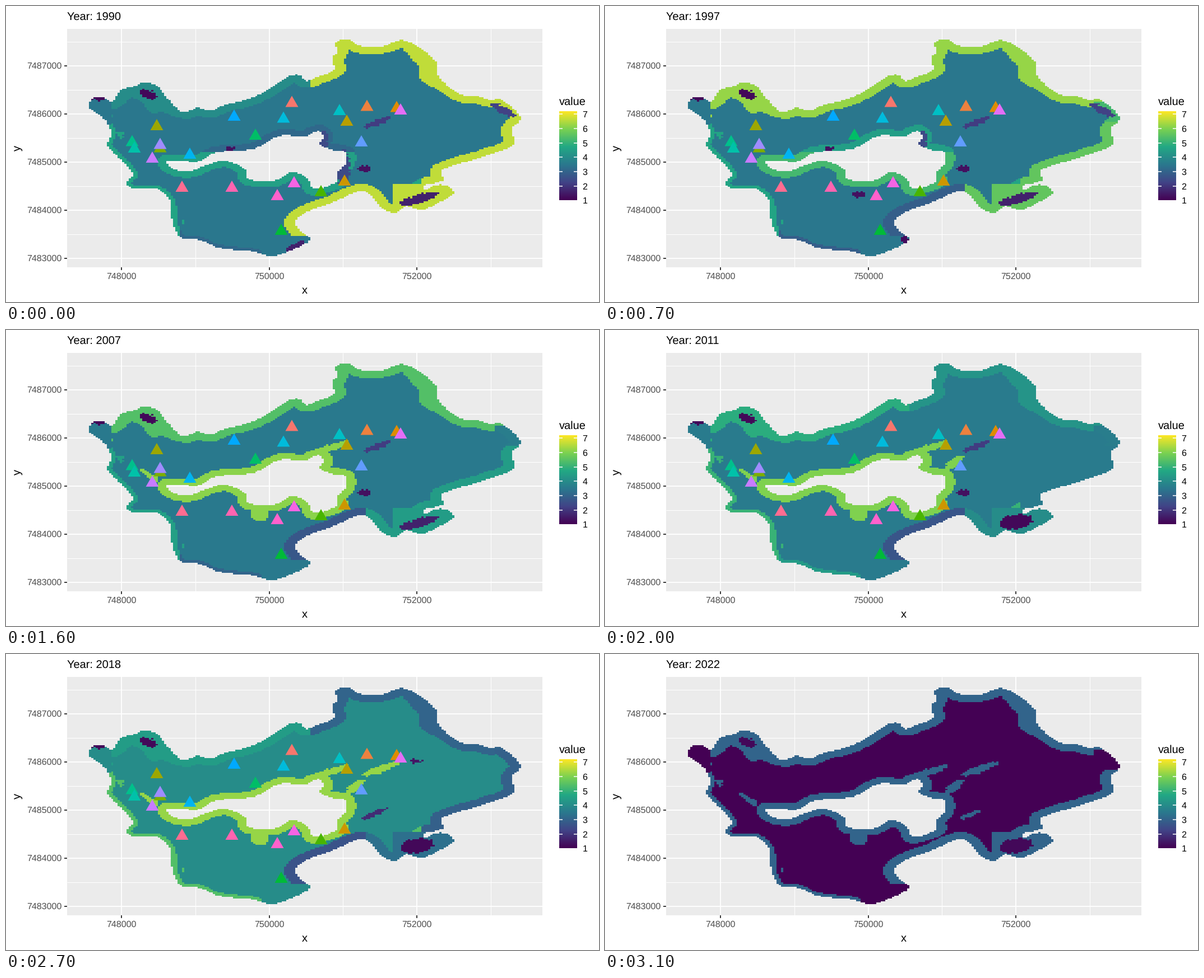
A matplotlib script that plays this animation: 1058 by 529 pixels, repeating every 3200 ms.

```python
import numpy as np
import matplotlib.pyplot as plt
from matplotlib.animation import FuncAnimation
from matplotlib.colors import LinearSegmentedColormap
from matplotlib.patches import Polygon, Rectangle
from matplotlib.path import Path

W, H, DPI = 1058, 529, 100
FRAMES, INTERVAL = 32, 100
LAST = FRAMES - 1
PX = 72 / DPI
LEFT, RIGHT, TOP, BOTTOM = 147.6, 918.0, 60.3, 447.2
COLS, ROWS = 195, 150
CELL_W, CELL_H = (RIGHT - LEFT) / COLS, (BOTTOM - TOP) / ROWS
V_MAX = 7.17

plt.rcParams.update({"font.family": "Liberation Sans", "text.hinting": "none"})
viridis = LinearSegmentedColormap.from_list(
    "scale", ["#440154", "#414487", "#2A788E", "#22A884", "#7AD151", "#FDE725"], 1024)

# Key points of the shorelines, clockwise, in stage pixels.
NORTH_SHORE = [
    (148, 182), (155, 164), (175, 164), (189, 172), (205, 150), (225, 145),
    (250, 137), (272, 146), (290, 168), (316, 190), (342, 182), (362, 188),
    (392, 176), (428, 168), (456, 156), (482, 140), (505, 126), (522, 124),
    (536, 134), (556, 127), (585, 113), (581, 95), (590, 82), (588, 66),
    (607, 60), (632, 72), (672, 72), (704, 61), (735, 73), (768, 103),
    (769, 122), (790, 146), (815, 160), (840, 161), (862, 168), (882, 167),
    (906, 185), (917, 203),
]
SOUTH_SHORE = [
    (902, 220), (905, 247), (850, 270), (776, 294), (778, 312), (744, 321),
    (748, 329), (762, 321), (784, 321), (798, 335), (770, 352), (740, 365),
    (714, 358), (694, 369), (672, 363), (638, 331), (578, 353), (535, 369),
    (515, 386), (527, 405), (543, 417), (505, 438), (472, 447), (440, 439),
    (380, 432), (340, 417), (312, 414), (297, 387), (293, 350), (270, 327),
    (226, 326), (215, 316), (226, 302), (214, 284), (192, 262), (180, 247),
    (187, 232), (183, 215), (170, 198),
]
ISLAND = [
    (287, 278), (318, 278), (343, 278), (365, 266), (380, 261), (440, 256),
    (465, 244), (490, 232), (532, 233), (558, 224), (566, 234), (560, 247),
    (575, 256), (604, 262), (606, 280), (591, 298), (590, 314), (548, 327),
    (538, 310), (512, 297), (494, 305), (475, 313), (432, 309), (427, 292),
    (390, 277), (358, 284), (325, 296), (296, 290),
]

# Zone values at the key frames; the final frame follows its own rule.
KEYS = [0, 4, 10, 16, 23, 27]
ZONES = {
    "core": (3.45, 3.5, 3.4, 3.5, 3.6, 4.0),
    "northwest": (4.0, 5.6, 6.8, 5.4, 4.4, 4.4),
    "north": (6.6, 5.6, 6.8, 5.4, 3.3, 3.0),
    "cape": (6.6, 3.6, 6.8, 3.6, 3.6, 2.9),
    "east": (6.6, 4.4, 6.8, 4.4, 2.9, 2.9),
    "lobe": (6.6, 4.4, 6.8, 4.4, 3.7, 3.3),
    "south": (6.6, 3.0, 2.7, 2.7, 2.6, 2.6),
    "southwest": (3.1, 3.0, 2.7, 3.0, 5.4, 5.4),
    "west": (4.6, 4.6, 4.6, 4.5, 5.4, 5.4),
    "ring north": (3.1, 3.0, 5.9, 6.1, 5.9, 6.2),
    "ring": (4.5, 4.5, 5.9, 6.1, 5.9, 6.2),
}
NAMES = list(ZONES)

# Ragged spots: value or zone, phases, centre x, y, radii, slope.
SPOTS = [
    (1.15, "0123456", 254, 159, 15, 8, 0.3),
    (1.15, "012345", 165, 166, 12, 4, 0),
    (2.2, "01", 886, 186, 22, 7, 0.5),
    (1.3, "2", 875, 177, 14, 3, 0),
    (1.6, "0123", 735, 345, 34, 8, -0.25),
    (1.15, "456", 733, 343, 29, 13, -0.1),
    (1.3, "01234", 638, 291, 11, 5, 0.2),
    (1.8, "5", 657, 286, 24, 5, -0.4),
    ("ring", "6", 650, 288, 20, 4, -0.4),
    (2.1, "0134", 662, 208, 24, 5, -0.4),
    (1.3, "2", 656, 212, 14, 7, 0),
    ("ring", "56", 668, 206, 34, 6, -0.35),
    ("ring", "456", 622, 238, 18, 8, -0.6),
    ("ring", "23456", 580, 210, 32, 6, -0.3),
    ("ring", "23456", 256, 260, 17, 6, 0.6),
    (2.4, "01", 566, 238, 8, 16, 0),
    (2.4, "0", 600, 288, 12, 32, 0),
    (1.3, "12", 451, 337, 12, 5, 0),
    ("ring", "3456", 452, 328, 17, 14, 0),
    (1.3, "01", 400, 255, 7, 3, 0),
    (1.6, "0", 515, 430, 18, 6, -0.5),
    (1.2, "1", 535, 419, 8, 8, 0),
    (1.4, "5", 730, 191, 10, 4, 0),
    ("west", "0123456", 203, 230, 7, 7, 0.6),
]

# Middles of the triangles, in order of hue.
MARKS = [
    (510, 170.5), (644, 177.5), (697, 179.5), (604, 311), (608, 204),
    (269, 212), (275, 251.5), (562, 330), (491, 399), (445, 229),
    (225, 240.5), (229, 252), (595, 185), (495, 198.5), (328, 263),
    (407, 195), (634, 241), (275, 245.5), (261, 270), (704, 184),
    (514, 314), (484, 337), (403, 322), (314, 322),
]

X, Y = np.meshgrid(LEFT + (np.arange(COLS) + 0.5) * CELL_W,
                   TOP + (np.arange(ROWS) + 0.5) * CELL_H)


def smooth(points, steps=16):
    """Closed Hermite curve with tangents scaled by chord length."""
    p = np.array(points, float)
    after, before = np.roll(p, -1, 0), np.roll(p, 1, 0)
    chord = np.linalg.norm(after - p, axis=1)[:, None]
    tangent = (after - before) / (chord + np.roll(chord, 1, 0))
    m0, m1 = tangent * chord, np.roll(tangent, -1, 0) * chord
    t = (np.arange(steps) / steps)[:, None, None]
    curve = ((2 * t**3 - 3 * t**2 + 1) * p + (t**3 - 2 * t**2 + t) * m0
             + (3 * t**2 - 2 * t**3) * after + (t**3 - t**2) * m1)
    return curve.transpose(1, 0, 2).reshape(-1, 2)


def inside(curve):
    cells = np.column_stack([X.ravel(), Y.ravel()])
    return Path(curve).contains_points(cells).reshape(X.shape)


def distance(curve):
    """Distance of each cell from the curve, in cells."""
    best = np.full(X.shape, np.inf)
    for px, py in curve:
        best = np.minimum(best, np.hypot((X - px) / CELL_W, (Y - py) / CELL_H))
    return best


def band_width():
    """Width of the shore band, in cells."""
    width = np.where((X < 312) & (Y > 200), 2.2, 4.9)
    width[(X < 460) & (Y > 390)] = 2.2
    width[(X > 690) & (Y > 319)] = 15
    width[(X < 188) & (Y < 212)] = 0
    width[(X > 455) & (X < 560) & (Y > 412)] = 0
    bumps = 7 * np.exp(-((X - 252) / 24) ** 2) + 3.5 * np.exp(-((X - 735) / 24) ** 2)
    return width + np.where(Y < 195, bumps, 0)


def build_zones(shore, island):
    zone = np.full(X.shape, NAMES.index("west"))

    def put(name, where):
        zone[where] = NAMES.index(name)

    put("northwest", (Y < 210) & (X > 186))
    put("north", (Y < 210) & (X > 543))
    put("east", (X > 740) & (Y > 205) & (Y < 321))
    put("cape", (X > 872) & (Y > 172) & (Y < 208))
    put("lobe", (X > 640) & (Y >= 319))
    put("south", (X > 490) & (X <= 640) & (Y > 318))
    put("southwest", (X > 311) & (X <= 490) & (Y > 390))
    put("core", distance(shore) >= band_width())
    ring = distance(island) < 4.3
    put("ring", ring)
    put("ring north", ring & (X > 350) & (Y < 262))
    return zone


def spot_mask(x, y, rx, ry, slope):
    dx = X + ROUGH[0] - x
    dy = Y + ROUGH[1] - y - slope * dx
    return (dx / rx) ** 2 + (dy / ry) ** 2 < 1


ROUGH = np.random.default_rng(4).uniform(-1, 1, (2, ROWS, COLS))
ROUGH *= np.array([2.5, 1.3])[:, None, None]
shore, island = smooth(NORTH_SHORE + SOUTH_SHORE), smooth(ISLAND)
LAND = inside(shore) & ~inside(island)
ZONE = build_zones(shore, island)
MASKS = [(value, phases, spot_mask(*shape)) for value, phases, *shape in SPOTS]


def zone_values(i):
    if i == LAST:
        return np.array([1.0 if n in ("core", "cape") else 3.0 for n in NAMES])
    return np.array([np.interp(i, KEYS, v) for v in ZONES.values()])


def phase_of(i):
    nearest = int(np.argmin(np.abs(np.array(KEYS) - i)))
    return str(len(KEYS) if i == LAST else nearest)


def raster(i):
    levels = zone_values(i)
    grid = levels[ZONE]
    for value, phases, where in MASKS:
        if phase_of(i) in phases:
            grid[where] = levels[NAMES.index(value)] if isinstance(value, str) else value
    rgba = viridis((grid - 1) / (V_MAX - 1))
    rgba[..., 3] = LAND
    return rgba


def hcl(hue, chroma=100, light=65):
    """Polar CIE-LUV colour as clipped sRGB."""
    h = np.radians(hue)
    u = chroma * np.cos(h) / (13 * light) + 0.1978
    v = chroma * np.sin(h) / (13 * light) + 0.4683
    y = ((light + 16) / 116) ** 3
    x, z = y * 9 * u / (4 * v), y * (12 - 3 * u - 20 * v) / (4 * v)
    m = np.array([[3.2406, -1.5372, -0.4986],
                  [-0.9689, 1.8758, 0.0415],
                  [0.0557, -0.2040, 1.0570]])
    rgb = np.clip(m @ (x, y, z), 0, 1)
    return np.where(rgb > 0.0031308, 1.055 * rgb ** (1 / 2.4) - 0.055, 12.92 * rgb)


fig = plt.figure(figsize=(W / DPI, H / DPI), dpi=DPI, facecolor="white")
ax = fig.add_axes([0, 0, 1, 1])
ax.axis("off")


def line(x, y, color, width, z=1):
    ax.plot(x, y, color=color, lw=width * PX, zorder=z, solid_capstyle="butt")


def text(x, y, label, size, **kw):
    return ax.text(x, y, label, fontsize=size * PX, **kw)


def triangle(x, y, color):
    corners = [(x, y - 10), (x + 11.5, y + 10), (x - 11.5, y + 10)]
    return ax.add_patch(Polygon(corners, fc=color, lw=0, zorder=4))


P_LEFT, P_RIGHT, P_TOP, P_BOTTOM = 109, 956.5, 41, 466.5
ax.add_patch(Rectangle((P_LEFT, P_TOP), P_RIGHT - P_LEFT, P_BOTTOM - P_TOP,
                       fc="#EBEBEB", lw=0, zorder=0))

for k in range(3):
    x = 206 + 263.5 * k
    line([x + 131.75] * 2, [P_TOP, P_BOTTOM], "white", 1)
    line([x] * 2, [P_TOP, P_BOTTOM], "white", 1.9)
    line([x] * 2, [P_BOTTOM, P_BOTTOM + 5], "#333333", 1.9)
    text(x, 488, str(748000 + 2000 * k), 16, color="#4D4D4D", ha="center")
for k in range(5):
    y = 106.5 + 86 * k
    line([P_LEFT, P_RIGHT], [y - 43] * 2, "white", 1)
    line([P_LEFT, P_RIGHT], [y] * 2, "white", 1.9)
    line([P_LEFT - 5, P_LEFT], [y] * 2, "#333333", 1.9)
    text(99.5, y + 5.8, str(7487000 - 1000 * k), 16, color="#4D4D4D", ha="right")

text(533, 514, "x", 20, ha="center")
text(21, 254, "y", 20, ha="center", va="center", rotation=90)
title = text(109, 26, "", 20)

text(987, 177, "value", 20)
ax.imshow(np.linspace(1, 0, 300)[:, None], cmap=viridis, aspect="auto",
          extent=(987, 1019, 347.5, 189), zorder=1)
for v in range(1, 8):
    y = 347.5 - (v - 1) * 25.67
    line([987, 993.4], [y] * 2, "white", 1.5, 2)
    line([1012.6, 1019], [y] * 2, "white", 1.5, 2)
    text(1028.5, y + 5.8, str(v), 16)

lake = ax.imshow(raster(0), extent=(LEFT, RIGHT, BOTTOM, TOP), aspect="auto",
                 interpolation="nearest", zorder=3)
marks = [triangle(x, y, hcl(15 + 15 * k)) for k, (x, y) in enumerate(MARKS)]
ax.set_xlim(0, W)
ax.set_ylim(H, 0)


def draw(i):
    title.set_text(f"Year: {round(1990 + 32 * i / LAST)}")
    lake.set_data(raster(i))
    for mark in marks:
        mark.set_visible(i < LAST)
    return [title, lake, *marks]


anim = FuncAnimation(fig, draw, frames=FRAMES, interval=INTERVAL, repeat=True,
                     repeat_delay=0, blit=False)
plt.show()
```
